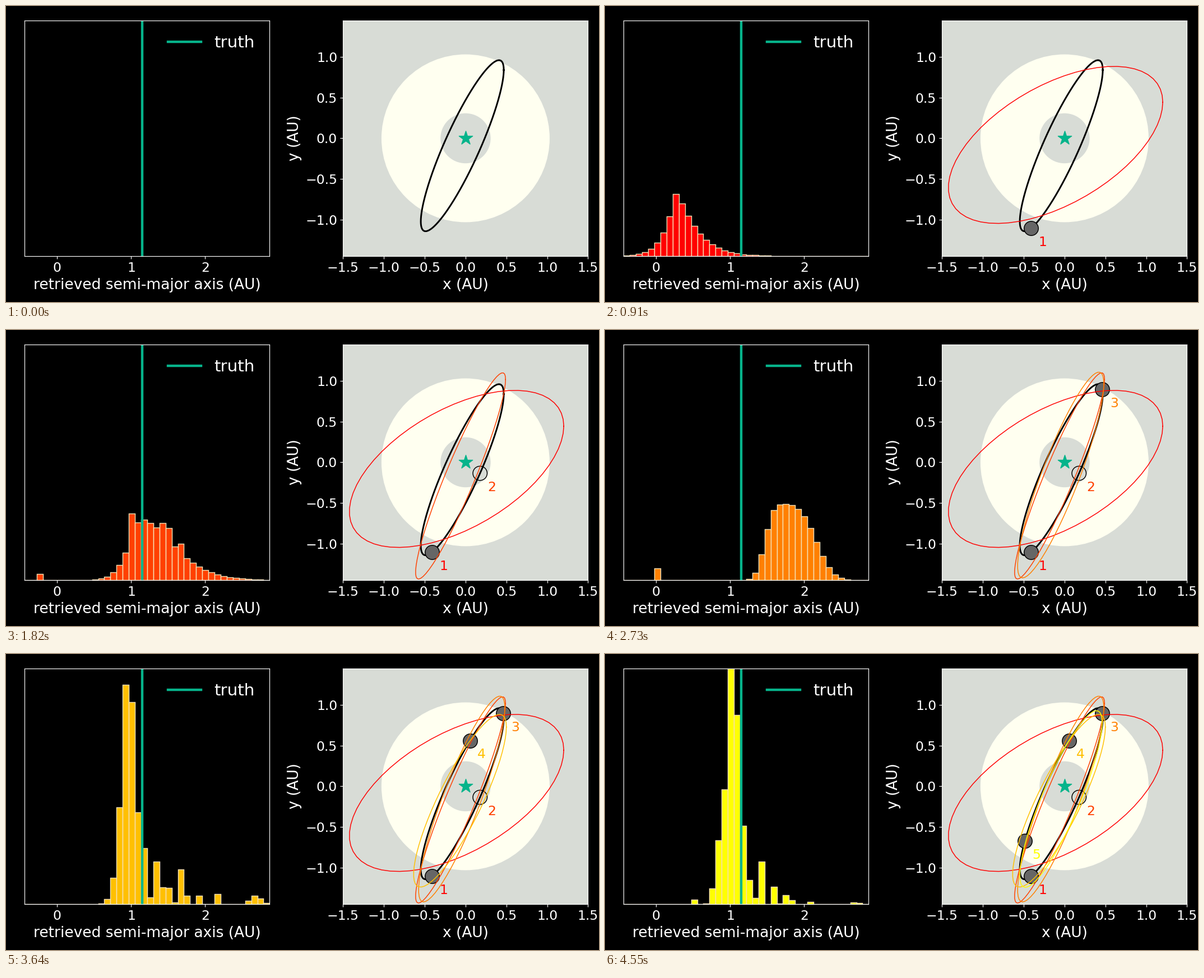
These frames come from a looping animation (1058x529 px, 5.46 s). A matplotlib script:

```python
import numpy as np
import matplotlib.pyplot as plt
from matplotlib.animation import FuncAnimation

WIDTH, HEIGHT, DPI = 1058, 529, 105.8
STEPS, STEP_MS = 6, 910
TEAL, GREY = "#06b48b", "#d8dcd6"
BINS, COUNT_MAX = 40, 421.3
TRUE_AXIS = 1.146
VISITS = STEPS - 1
COLORS = plt.cm.autumn(np.linspace(0, 1, VISITS))

# Centre x, centre y, half width, half height, correlation
TRUE_ORBIT = (-0.040, -0.091, 0.508, 1.050, 0.885)
FITS = [
    (-0.110, -0.081, 1.313, 0.964, 0.545),
    (-0.061, -0.167, 0.551, 1.266, 0.935),
    (-0.047, -0.156, 0.528, 1.263, 0.885),
    (-0.068, -0.177, 0.568, 1.060, 0.853),
    (-0.044, -0.156, 0.504, 1.084, 0.865),
]
FIRST_PHASE = -2.385
HIDDEN_PLANET = 1


def hump(height, centre, left=0.4, right=None, power=2):
    """A peak over the bins with its own width on each side."""
    offset = np.arange(BINS) - centre
    width = np.where(offset < 0, left, right or left)
    return height * np.exp(-np.abs(offset / width) ** power)


HISTOGRAMS = [
    hump(115, 8.1, 2.1, 3.7, 1.15),
    hump(110, 18.5, 2.85, 7.3, 1.6) + hump(42, 17) + hump(30, 22.6, 1, 0.8)
    + hump(17, 25) + hump(11, 2),
    hump(136, 25.5, 3.4, 6.2, 3) + hump(21.5, 5),
    hump(445, 16.4, 1.45, 1.6, 1.6) + hump(50, 19) + hump(72, 21)
    + hump(40, 22.5, 0.9) + hump(62, 25) + hump(15, 26) + hump(15, 28)
    + hump(18, 31) + hump(16, 37.2, 1.2),
    hump(490, 17.2, 1.3, 1.55, 1.5) + hump(65, 14.8, 0.7) + hump(8, 11)
    + hump(74, 22) + hump(31, 24) + hump(19, 26.3, 0.7) + hump(4, 30)
    + hump(3.5, 37.4, 0.8),
]


def add_axes(left, right, top=25.8, bottom=447.1):
    return fig.add_axes([left / WIDTH, 1 - bottom / HEIGHT,
                         (right - left) / WIDTH, (bottom - top) / HEIGHT])


def on_orbit(orbit, phase):
    cx, cy, half_w, half_h, corr = orbit
    return (cx + half_w * np.cos(phase),
            cy + half_h * np.cos(phase - np.arccos(corr)))


def draw_orbit(orbit, points, **style):
    return sky_ax.plot(*on_orbit(orbit, np.linspace(0, 2 * np.pi, points)),
                       **style)[0]


def draw_histogram(heights, color):
    return hist_ax.bar(edges[:-1], heights, np.diff(edges), align="edge",
                       color=color, edgecolor="wheat", linewidth=1)


def draw_visit(index):
    """The planet at one visit, its number and the orbit fitted then."""
    color = COLORS[index]
    spot = on_orbit(TRUE_ORBIT, FIRST_PHASE + index * 2 * np.pi / VISITS)
    fit = draw_orbit(FITS[index], 60, color=color, lw=1, zorder=4)
    face = "none" if index == HIDDEN_PLANET else "#666666"
    planet = sky_ax.scatter(*spot, s=300, facecolor=face, edgecolor="black",
                            zorder=3)
    label = sky_ax.annotate(str(index + 1), spot, (9.1, -21.5),
                            textcoords="offset points", color=color,
                            fontsize=16, zorder=6)
    return [fit, planet, label]


plt.style.use("dark_background")
plt.rcParams.update({"font.family": "DejaVu Sans", "axes.labelsize": 18,
                     "xtick.labelsize": 16, "ytick.labelsize": 16})
fig = plt.figure(figsize=(WIDTH / DPI, HEIGHT / DPI), dpi=DPI)

hist_ax = add_axes(33.4, 470.4)
edges = np.linspace(-0.439, 2.871, BINS + 1)
hist_ax.axvline(TRUE_AXIS, color=TEAL, lw=3, label="truth")
hist_ax.legend(loc="upper right", fontsize=20, frameon=False)
hist_ax.set(xlim=edges[[0, -1]], ylim=(0, COUNT_MAX), xticks=range(3),
            yticks=[], xlabel="retrieved semi-major axis (AU)")

sky_ax = add_axes(601.4, 1038.4)
sky_ax.set_facecolor(GREY)
for radius, color in ((1.03, "ivory"), (0.307, GREY)):
    sky_ax.add_patch(plt.Circle((0, 0), radius, color=color, lw=0))
draw_orbit(TRUE_ORBIT, 400, color="black", lw=2)
sky_ax.scatter(0, 0, s=300, marker="*", color=TEAL, zorder=5)
sky_ax.set(xlim=(-1.5, 1.5), ylim=(-1.447, 1.447),
           xticks=np.arange(-1.5, 1.6, 0.5), yticks=np.arange(-1, 1.1, 0.5),
           xlabel="x (AU)", ylabel="y (AU)")

histograms = [draw_histogram(h, c) for h, c in zip(HISTOGRAMS, COLORS)]
visits = [draw_visit(i) for i in range(VISITS)]


def update(step):
    """Show the latest histogram and every visit made so far."""
    for number, (bars, visit) in enumerate(zip(histograms, visits), start=1):
        for bar in bars:
            bar.set_visible(number == step)
        for artist in visit:
            artist.set_visible(number <= step)
    return []


anim = FuncAnimation(fig, update, frames=STEPS, interval=STEP_MS,
                     repeat=True, repeat_delay=0, blit=False)
plt.show()
```
